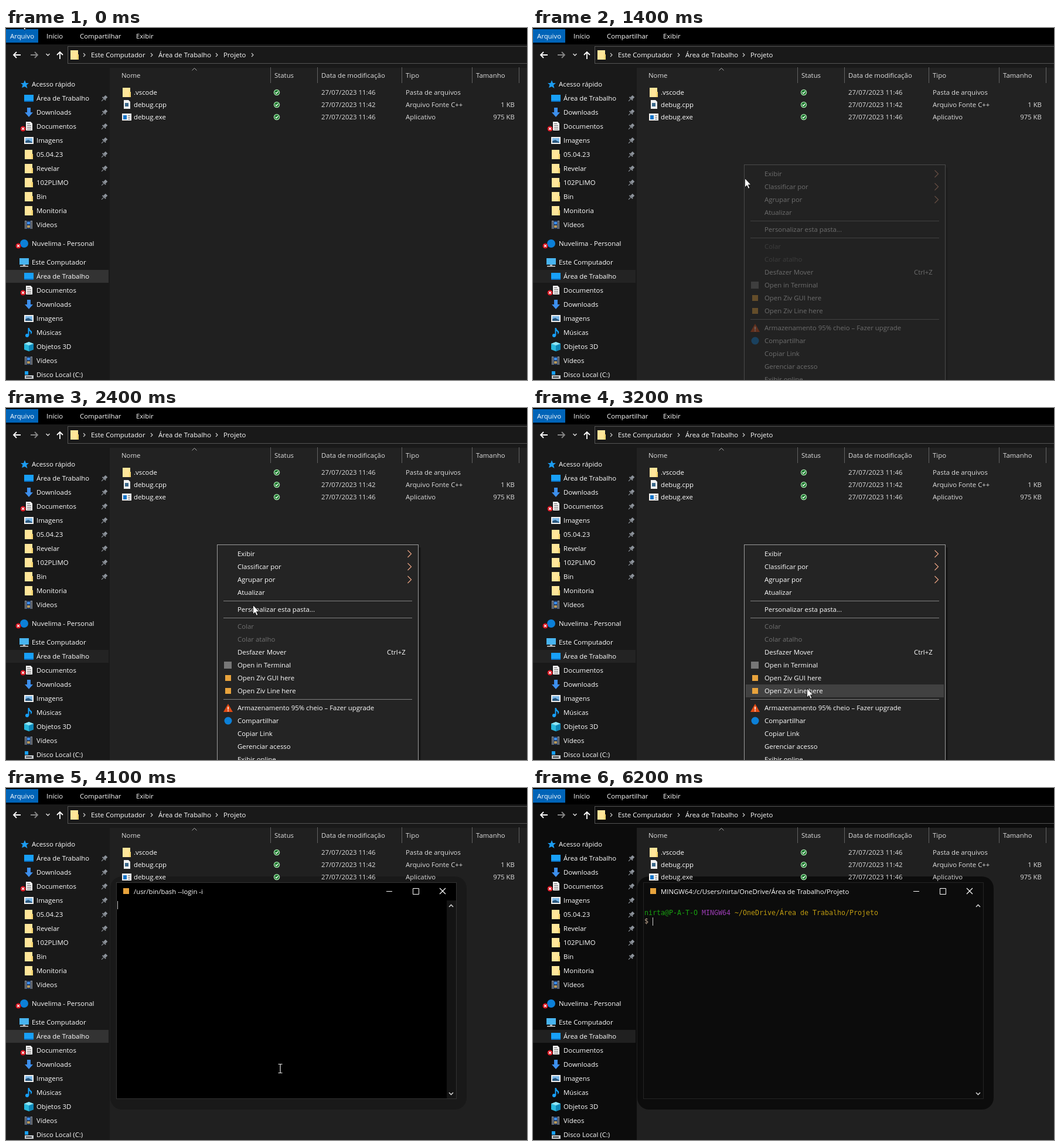
An HTML page for the animation above (6400 ms loop, 889 px wide and 601 px high).

```html
<!DOCTYPE html>
<html lang="pt">
<head>
<meta charset="utf-8">
<style>
  html, body { margin: 0; height: 100%; overflow: hidden; background: #191919; }
  svg { display: block; width: 889px; height: 601px; }
  text { font: 11.4px "Open Sans", "Noto Sans", sans-serif; white-space: pre; }
  .mono { font: 11.63px "DejaVu Sans Mono", monospace; }
</style>
</head>
<body>
<svg id="stage" viewBox="0 0 889 601"></svg>
<script>
const LOOP = 6400, STEP = 100;
const stage = document.getElementById('stage');

// Text is placed by the vertical middle of its capitals.
const text = (x, y, s, fill = '#fff', attrs = '') =>
  `<text x="${x}" y="${y + 4}" fill="${fill}" ${attrs}>${s}</text>`;
const rect = (x, y, w, h, fill, attrs = '') =>
  `<rect x="${x}" y="${y}" width="${w}" height="${h}" fill="${fill}" ${attrs}/>`;
const circle = (x, y, r, fill, attrs = '') =>
  `<circle cx="${x}" cy="${y}" r="${r}" fill="${fill}" ${attrs}/>`;
const line = (d, stroke, width = 1) =>
  `<path d="${d}" fill="none" stroke="${stroke}" stroke-width="${width}"/>`;
const shape = (d, fill) => `<path d="${d}" fill="${fill}"/>`;
const at = (x, y, content) => `<g transform="translate(${x} ${y})">${content}</g>`;

// Icons are drawn around their own centre.
const badge = circle(-10, 4, 4.5, '#d8101c') + line('M-12 2l4 4m0-4l-4 4', '#fff', 1.3);
const page = shape('M-5-8H3L6-5V7H-5Z', '#f2f2f2');
const icons = {
  folder: rect(-7, -8, 13, 16, '#ffe69a') + rect(4, -1, 3, 9, '#f7d774'),
  desktop: rect(-8, -6, 16, 11, '#18a0f8') + rect(-8, 4, 16, 2, '#0a6fc0'),
  download: shape('M-3-8H3V0H7L0 8L-7 0H-3Z', '#3d8fec'),
  document: page + line('M-3-4.5H2M-3-1.5H4M-3 1.5H4M-3 4.5H4', '#666') + badge,
  picture: rect(-8, -6, 16, 12, '#f0f0f0') + rect(-6, -4, 12, 8, '#7db8e8') +
    shape('M-6 4V1L-1-1L6 3V4Z', '#28567c'),
  video: rect(-7, -7, 13, 14, '#8a93a0') + rect(-4, -7, 7, 14, '#263c60') +
    rect(-3, -5, 5, 4, '#3d8fec') + rect(-3, 1, 5, 4, '#b89858') +
    line('M-5.5-6V7M4.5-6V7', '#333'),
  music: circle(-3, 5, 3, '#18a0f8') + shape('M-1.5-8H.5Q1-5 5-2Q6 1 3 3Q4-1 .5-3V5H-1.5Z', '#18a0f8'),
  cube: shape('M0-8L8-5V5L0 8L-8 5V-5Z', '#28b8dc') + shape('M0-2L8-5V5L0 8Z', '#0f88b8') +
    shape('M0-8L8-5L0-2L-8-5Z', '#90e4f4'),
  disk: rect(-7, 1, 15, 6, '#c8ccd0') + rect(-5, 3, 10, 2, '#444') + rect(-7, -6, 6, 6, '#18a0f8'),
  star: shape('M1-7L3-2L8-2L4 1.5L5.5 7L1 4L-4 6L-2.5 1L-6-2L-1-2Z', '#1c9cf0'),
  cloud: circle(0, 0, 7, '#0c80d8') + badge,
  computer: rect(-8, -7, 16, 11, '#48b4f0') + rect(-2, 4, 4, 2, '#aaa') + rect(-7, 6, 14, 1.5, '#d8d8d8'),
  pin: '<g transform="rotate(45)">' + rect(-2.5, -5, 5, 5, '#8c929a') + rect(-4, 0, 8, 1.8, '#8c929a') +
    rect(-.6, 2, 1.2, 5, '#8c929a') + '</g>',
  source: page + rect(-3, -3, 6, 6, '#3c6a8c'),
  program: rect(-8, -6, 16, 12, '#f0f0f0') + rect(-6, -3, 6, 7, '#1474c8') + line('M2-2.5H6M2 .5H6M2 3.5H6', '#777'),
  check: circle(0, 0, 4.6, '#17762a', 'stroke="#a4dca8" stroke-width="1.3"') + line('M-2.2 0L-.6 1.8L2.4-1.8', '#fff', 1.4),
  prompt: rect(-7, -6, 13, 12, '#777'),
  tool: rect(-5, -5, 10, 10, '#e8a33c'),
  warning: shape('M0-7L8 7H-8Z', '#e04a14') + line('M0-2V3M0 4.2V6', '#fff', 1.6),
  sync: circle(0, 0, 6.5, '#0c80d8'),
};
const icon = (name, x, y) => at(x, y, icons[name]);
const chevron = (x, y) => line(`M${x - 1.5} ${y - 3}l3 3l-3 3`, '#ccc', 1.2);

// The panels darken once the shell is ready.
const panel = t => t < 5200 ? '#191919' : '#0c0c0c';

const quickAccess = [
  ['desktop', 'Área de Trabalho'], ['download', 'Downloads'], ['document', 'Documentos'],
  ['picture', 'Imagens'], ['folder', '05.04.23'], ['folder', 'Revelar'],
  ['folder', '102PLIMO'], ['folder', 'Bin'], ['folder', 'Monitoria'], ['video', 'Vídeos'],
];
const computer = [
  ['desktop', 'Área de Trabalho'], ['document', 'Documentos'], ['download', 'Downloads'],
  ['picture', 'Imagens'], ['music', 'Músicas'], ['cube', 'Objetos 3D'],
  ['video', 'Vídeos'], ['disk', 'Disco Local (C:)'],
];
const files = [
  ['folder', '.vscode', '11:46', 'Pasta de arquivos', ''],
  ['source', 'debug.cpp', '11:42', 'Arquivo Fonte C++', '1 KB'],
  ['program', 'debug.exe', '11:46', 'Aplicativo', '975 KB'],
];
// Empty entries are separators.
const menuItems = [
  ['Exibir', '>'], ['Classificar por', '>'], ['Agrupar por', '>'], ['Atualizar'], [],
  ['Personalizar esta pasta...'], [],
  ['Colar', 'off'], ['Colar atalho', 'off'], ['Desfazer Mover', 'Ctrl+Z'],
  ['Open in Terminal', '', 'prompt'], ['Open Ziv GUI here', '', 'tool'], ['Open Ziv Line here', '', 'tool'], [],
  ['Armazenamento 95% cheio – Fazer upgrade', '', 'warning'], ['Compartilhar', '', 'sync'],
  ['Copiar Link'], ['Gerenciar acesso'], ['Exibir online'],
];
// Start time, x, y of the pointer tip.
const pointerPath = [
  [0, 25, -15], [200, 60, 13], [300, 144, 81], [400, 243, 162], [500, 327, 230], [600, 361, 256],
  [2000, 364, 258], [2200, 372, 267], [2300, 396, 302], [2400, 421, 336], [2500, 441, 378],
  [2600, 454, 414], [2700, 461, 440], [2800, 465, 460], [2900, 466, 474], [3100, 466, 476], [3200, 467, 478],
];

function toolbar(t) {
  const tabs = [['Arquivo', 7], ['Início', 69], ['Compartilhar', 126], ['Exibir', 222]];
  const crumbs = [['Este Computador', 145], ['Área de Trabalho', 260], ['Projeto', 371]];
  return rect(0, 0, 889, 28, '#000') + rect(0, 2, 55, 23, '#0064b8') +
    tabs.map(([s, x]) => text(x, 14, s)).join('') +
    rect(105.5, 31.5, 800, 29, panel(t), 'stroke="#535353"') +
    line('M25 46H13M18 41L13 46L18 51', '#fff', 1.8) +
    line('M42 46H54M49 41L54 46L49 51', '#858585', 1.8) +
    line('M68.5 44L71.5 47L74.5 44', '#ddd', 1.5) +
    line('M92 53V41M87 46L92 41L97 46', '#fff', 1.8) +
    icon('folder', 117, 46) +
    crumbs.map(([s, x]) => chevron(x - 11.5, 46) + text(x, 46, s)).join('') +
    (t < 1100 ? chevron(420.5, 46) : '');
}

function sidebar(t) {
  const selected = t < 1100 ? '#333' : t < 3900 ? '#232323' : t < 5200 ? '#333' : '#202020';
  const rows = (list, top, pinned) => list.map(([name, label], i) => {
    const y = top + i * 24;
    return icon(name, 39, y) + text(52, y, label) + (i < pinned ? icon('pin', 168, y) : '');
  }).join('');
  return rect(0, 413, 175, 22, selected) +
    icon('star', 31, 96) + text(44, 96, 'Acesso rápido') + rows(quickAccess, 120, 8) +
    icon('cloud', 31, 368) + text(44, 368, 'Nuvelima - Personal') +
    icon('computer', 31, 400) + text(44, 400, 'Este Computador') + rows(computer, 424, 0);
}

function fileList(t) {
  const heads = [['Nome', 197], ['Status', 458], ['Data de modificação', 538], ['Tipo', 682], ['Tamanho', 802]];
  const shadow = t < 3900 ? '' : rect(178, 151, 608, 398, panel(t), 'rx="20"');
  return rect(177, 68, 712, 533, t >= 1100 && t < 3900 ? '#222' : '#202020') + shadow +
    heads.map(([s, x]) => text(x, 81, s, '#dedede')).join('') +
    line('M451.5 67V94M531.5 67V94M675.5 67V94M795.5 67V94M875.5 67V94', '#636363') +
    line('M317.5 72.5L321.5 68.5L325.5 72.5', '#aaa') +
    files.map(([name, label, hour, type, size], i) => {
      const y = 110 + i * 21;
      return icon(name, 206, y) + text(218, y, label) + icon('check', 462, y) +
        text(538, y, '27/07/2023 ' + hour, '#dedede') + text(682, y, type, '#dedede') +
        text(868, y, size, '#dedede', 'text-anchor="end"');
    }).join('');
}

function menu(t, pointerY) {
  if (t < 1400 || t >= 3700) return '';
  let y = 238;
  const rows = menuItems.map(([label, extra, name]) => {
    if (!label) {
      y += 7;
      return line(`M371 ${y - 3.5}H693`, '#808080');
    }
    const top = y, mid = y + 11;
    y += 22;
    const hovered = t >= 2500 && pointerY >= top && pointerY < y;
    return (hovered ? rect(363, top, 338, 22, '#414141') : '') +
      (name ? icon(name, 379, mid) : '') +
      text(395, mid, label, extra === 'off' ? '#707070' : '#fff') +
      (extra === '>' ? line(`M685.5 ${mid - 6}l6 6l-6 6`, '#e8a283', 1.2) : '') +
      (extra === 'Ctrl+Z' ? text(650, mid, extra) : '');
  }).join('');
  return `<g opacity="${Math.min(1, (t - 1300) / 300)}">` + rect(704, 238, 4, 363, '#171717') +
    rect(360.5, 233.5, 343, 380, '#242424', 'stroke="#9c9c9c"') + rows + '</g>';
}

function terminal(t) {
  if (t < 3900) return '';
  const ready = t >= 5200;
  const frame = rect(188.5, 161.5, 580, 369, ready ? '#0c0c0c' : '#000', `stroke="${ready ? '#242424' : '#333'}"`);
  if (t < 4100) return frame;
  const title = ready ? 'MINGW64:/c/Users/nirta/OneDrive/Área de Trabalho/Projeto' : '/usr/bin/bash --login -i';
  const mono = (x, y, s, fill) => text(x, y, s, fill, 'class="mono"');
  const caretOn = !(t >= 4400 && t < 4700) && !(t >= 5700 && t < 6200);
  return frame + (ready ? '' : rect(752, 192, 16, 338, '#141414')) +
    icon('tool', 205, 176) + text(218, 177, title) +
    line('M649 176.5H659M694.5 171.5H704.5V181.5H694.5Z', '#fff') +
    line('M740 171L750 181M750 171L740 181', '#fff', 1.2) +
    line('M756 203L759.5 199.5L763 203M756 520L759.5 523.5L763 520', '#ccc', 1.6) +
    (ready ? mono(190, 213, 'nirta@P-A-T-O', '#18a010') + mono(288, 213, 'MINGW64', '#9c3cb4') +
      mono(344, 213, '~/OneDrive/Área de Trabalho/Projeto', '#bd9a10') + mono(190, 227, '$', '#c4ac94') : '') +
    (caretOn ? ready ? rect(204, 221, 1, 14, '#ccc') : rect(190, 193, 1, 14, '#ccc') : '');
}

function pointer(t, x, y) {
  if (t >= 6200) return '';
  if (t >= 3900) return line('M464.5 471.5H471.5M464.5 486.5H471.5M468 471.5V486.5', '#e8e8e8', 1.2);
  return at(x, y, '<path d="M.5.5V16L4 12.8L6.4 18.3L8.8 17.3L6.4 11.8H11Z" fill="#fff" stroke="#000" stroke-width=".8"/>');
}

function scene(t) {
  const [, x, y] = pointerPath.findLast(([start]) => start <= t);
  return rect(0, 0, 889, 601, panel(t)) + toolbar(t) + sidebar(t) + fileList(t) +
    menu(t, y) + terminal(t) + pointer(t, x, y);
}

let shown = -1;
function tick() {
  const t = Math.floor(performance.now() % LOOP / STEP) * STEP;
  if (t !== shown) stage.innerHTML = scene(shown = t);
  requestAnimationFrame(tick);
}
tick();
</script>
</body>
</html>
```
